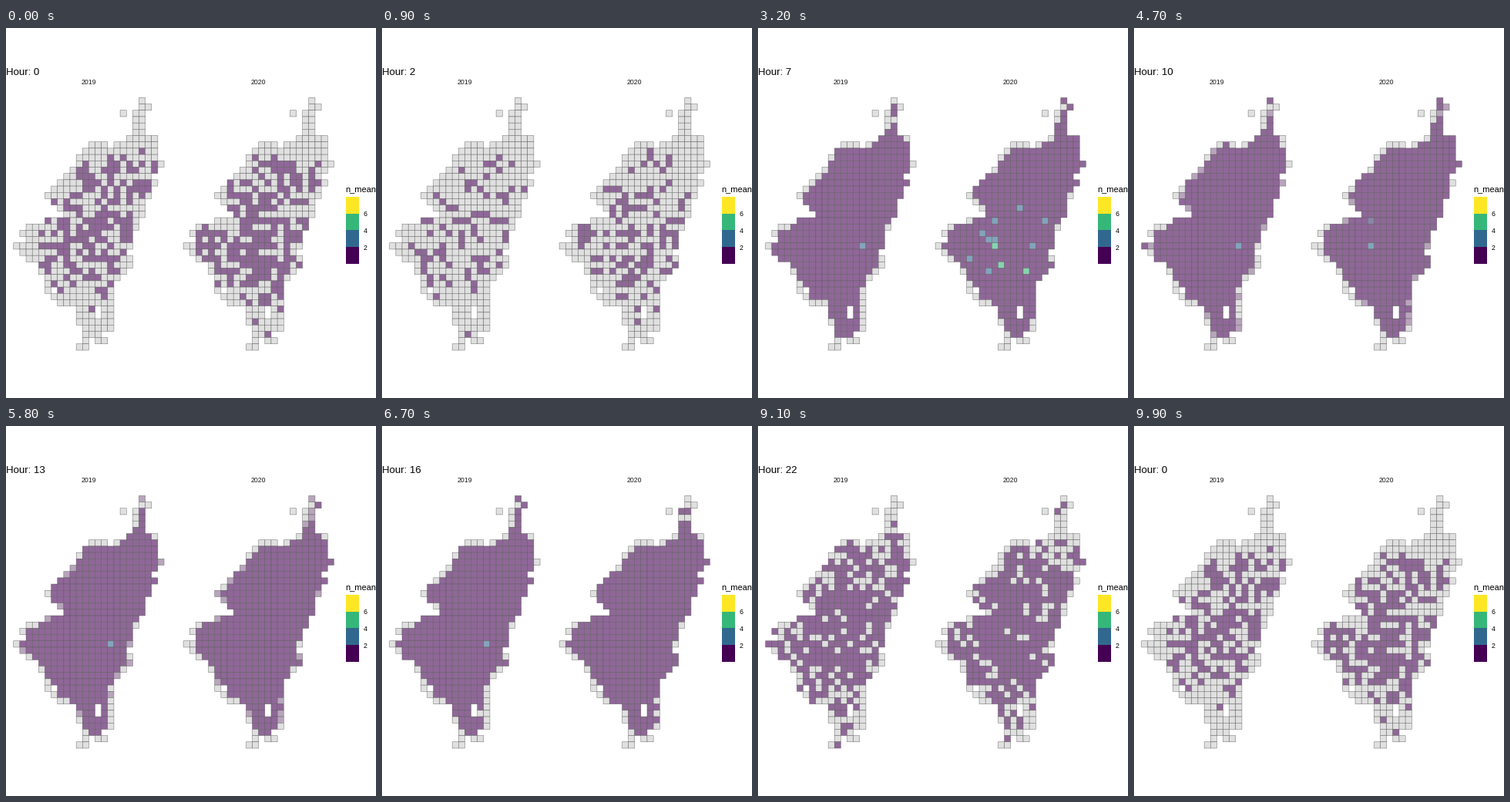
Animation of 480x480 px, one loop 10000 ms. Source, as a matplotlib script:

```python
import numpy as np
import matplotlib.pyplot as plt
from matplotlib.animation import FuncAnimation
from matplotlib.collections import PolyCollection
from matplotlib.colors import to_rgb
from matplotlib.patches import Rectangle

SIZE, DPI = 480, 96
PT = 72 / DPI
ROWS, COLS = 40, 24
PANEL_W, GAP = 214.8, 5.5
STEP_X, STEP_Y, TOP = PANEL_W / 1.1 / COLS, 8.19, 90.4
LEGEND_X = 2 * PANEL_W + GAP + 5.5
VIRIDIS = ["#440154", "#31688e", "#35b779", "#fde725"]

# Turning points (row, column) of the two coasts, north to south.
WEST = [(1, 20), (2, 19), (5, 19), (6, 18), (7, 12), (9, 10), (10, 10), (15, 5),
        (18, 8), (20, 2), (21, 1), (22, 2), (23, 0), (25, 2), (26, 4), (27, 4),
        (28, 5), (30, 5), (32, 7), (33, 10), (38, 11), (39, 10)]
EAST = [(0, 20), (1, 21), (2, 20), (5, 20), (6, 22), (9, 22), (10, 23), (12, 21),
        (13, 22), (14, 21), (20, 19), (21, 18), (23, 18), (24, 17), (25, 18),
        (27, 17), (29, 15), (36, 15), (37, 13), (38, 14), (39, 11)]

# Hour and activity at the turning points of the day.
DAY = [(0, -1.4), (4, -3.1), (5, -1.2), (7, 4.2), (17, 4.0), (20, 0.9), (24, -1.4)]

# Hot spot (row, column, strength), busiest cells and their hourly decay.
PANELS = {
    "2019": dict(spot=(21, 13, 1.8), hubs=[(23, 15)], decay=0.93),
    "2020": dict(spot=(23, 12, 2.5), decay=0.5,
                 hubs=[(23, 9), (19, 9), (22, 9), (23, 15), (26, 10), (25, 5),
                       (17, 13), (21, 7), (27, 14), (22, 8), (19, 17), (27, 8)])}

# Tick at which each hour starts to turn into the next one.
STARTS = [*range(2, 27, 5), *range(27, 48, 4), *range(50, 99, 4)]

rows, cols = np.mgrid[:ROWS, :COLS]


def along(points, x):
    return np.interp(x, *zip(*points))


def over_white(color, alpha=0.6):
    return np.array(to_rgb(color)) * alpha + 1 - alpha


FILLS = np.array([over_white("#cccccc")] + [over_white(c) for c in VIRIDIS])


def build_land():
    land = (cols >= along(WEST, rows).round()) & (cols <= along(EAST, rows).round())
    land[[7, 30, 33, 34, 38], [15, 6, 13, 13, 12]] = False
    land[2, 17] = True
    return land


def build_coast(land):
    """0 inland to 1 at exposed cells; the north-eastern road stays busier."""
    padded = np.pad(land.astype(int), 1)
    around = sum(padded[i:i + ROWS, j:j + COLS]
                 for i in range(3) for j in range(3)) - 1
    coast = np.clip((6.8 - around) / 2.5, 0, 1)
    coast[:, 20:] *= 0.5
    return coast


def build_levels(land, seed, spot, hubs, decay):
    rng = np.random.default_rng(seed)
    row, col, strength = spot
    distance = np.hypot(rows - row, cols - col)
    heat = strength * np.exp(-(distance / 11) ** 2)
    heat -= 0.08 * np.maximum(0, abs(rows - 20) - 9)
    coast = build_coast(land)
    habit = rng.normal(size=land.shape)
    levels = []
    for hour in range(24):
        activity = along(DAY, hour)
        noise = 1.1 * habit + rng.normal(size=land.shape)
        penalty = coast * (0.9 + 1.3 * max(activity, 0))
        level = (activity + heat - penalty + noise > 0).astype(int)
        if hour >= 7:
            active = round(len(hubs) * decay ** (hour - 7))
            for i, hub in enumerate(hubs[:active]):
                level[hub] = 3 if active > 6 and i % 4 == 0 else 2
        levels.append(level[land])
    return np.array(levels)


def square(x, row, col):
    x0, y0 = x + col * STEP_X, TOP + row * STEP_Y
    x1, y1 = x0 + STEP_X, y0 + STEP_Y
    return [(x0, y0), (x1, y0), (x1, y1), (x0, y1)]


def label(x, y, text, size, color="black", **kwargs):
    return ax.text(x, y, text, fontsize=size * PT, color=color,
                   family="Liberation Sans", va="baseline", **kwargs)


fig = plt.figure(figsize=(SIZE / DPI, SIZE / DPI), dpi=DPI, facecolor="white")
ax = fig.add_axes([0, 0, 1, 1])
ax.set(xlim=(0, SIZE), ylim=(SIZE, 0))
ax.axis("off")

land = build_land()
maps = []
for i, (year, traits) in enumerate(PANELS.items()):
    left = i * (PANEL_W + GAP)
    margin = PANEL_W / 22
    cells = PolyCollection([square(left + margin, r, c) for r, c in np.argwhere(land)],
                           edgecolors="#595959", linewidths=0.43 * PT)
    cells.set_snap(False)
    ax.add_collection(cells)
    maps.append((cells, FILLS[build_levels(land, i + 11, **traits)]))
    label(left + PANEL_W / 2, 73.2, year, 8.8, "#1a1a1a", ha="center")

label(LEGEND_X, 212, "n_mean", 11)
for i, color in enumerate(reversed(VIRIDIS)):
    ax.add_patch(Rectangle((LEGEND_X, 219.2 + 21.6 * i), 17.3, 21.6, color=color, lw=0))
for i, value in enumerate("642"):
    label(LEGEND_X + 22.8, 244 + 21.8 * i, value, 8.8)
title = label(0, 61, "", 13.2)


def phase(tick):
    """Current hour and how far it has turned into the next one."""
    hour = sum(tick >= start for start in STARTS) - 1
    if hour < 0:
        return 0, 0
    steps = 3 if hour < 5 else 2
    return hour, min(1, (tick - STARTS[hour] + 1) / steps)


def update(tick):
    hour, t = phase(tick)
    following = (hour + 1) % 24
    for cells, fills in maps:
        cells.set_facecolor(fills[hour] * (1 - t) + fills[following] * t)
    title.set_text(f"Hour: {following if t > 0.5 else hour}")
    return [title, *(cells for cells, _ in maps)]


anim = FuncAnimation(fig, update, frames=100, interval=100, repeat=True,
                     repeat_delay=0)
plt.show()
```
